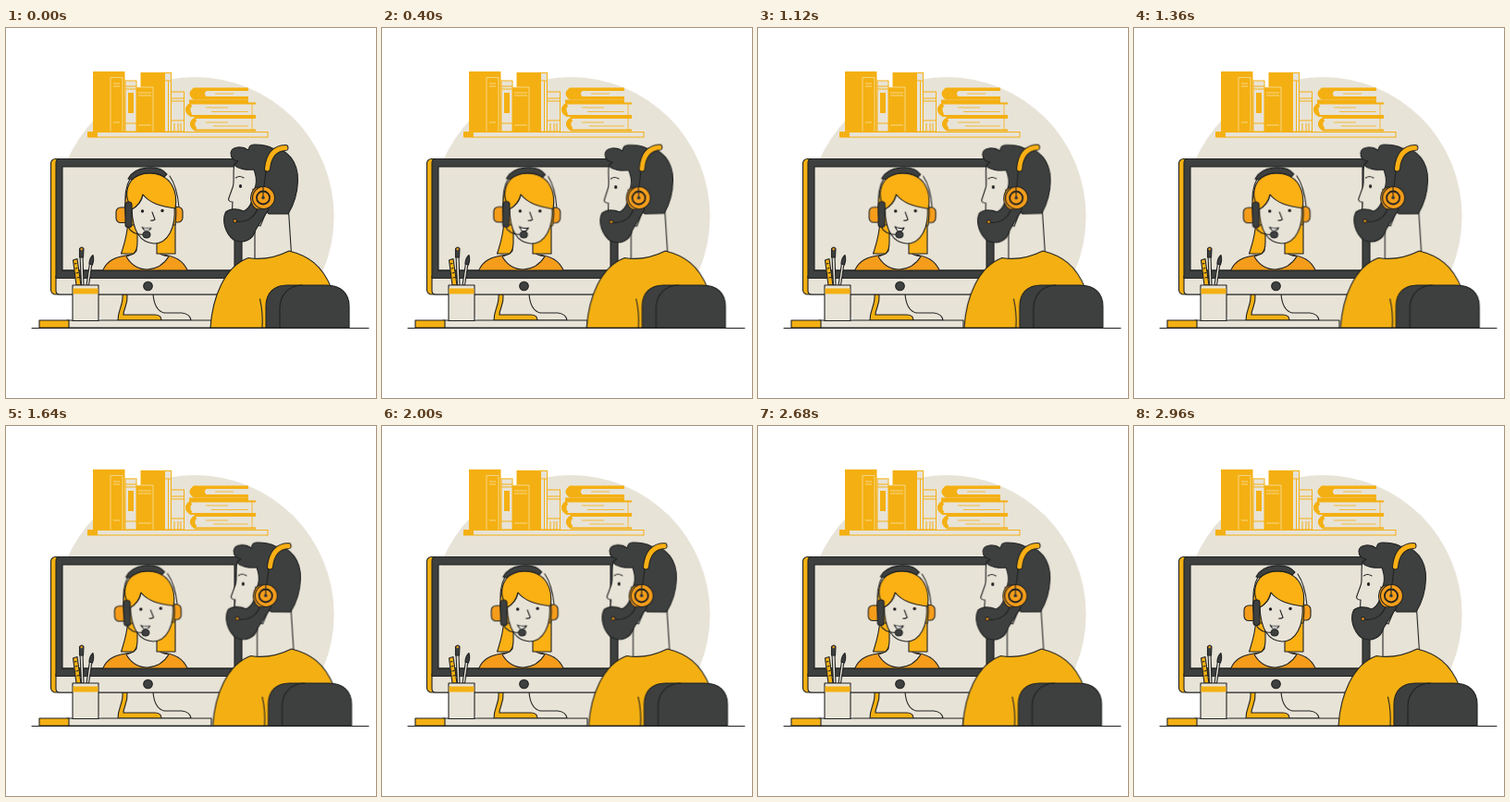
These frames come from a looping animation (400x400 px, 3 s). An HTML page:

```html
<!DOCTYPE html>
<html lang="en">
<head>
<meta charset="utf-8">
<title>Video call</title>
<style>
  html, body { margin: 0; width: 100%; height: 100%; overflow: hidden; background: #fff; }
  svg { display: block; width: 100vw; height: 100vh; }

  :root { --gold: #f4b012; --amber: #f59d1b; --hair: #fbb014; --sand: #e8e3d7; --dark: #3d403f; --ink: #202222; }
  .gold { fill: var(--gold); }
  .amber { fill: var(--amber); }
  .hair { fill: var(--hair); }
  .sand { fill: var(--sand); }
  .dark { fill: var(--dark); }
  .line { fill: none; stroke: var(--ink); stroke-width: 1.1; stroke-linecap: round; stroke-linejoin: round; }
  .edge { stroke: var(--ink); stroke-width: 1.1; stroke-linejoin: round; }
  .trim { stroke: var(--gold); stroke-width: 1; }
  .seam { fill: none; stroke: #f8dfa4; stroke-width: .8; }

  .man, .nod, .woman, .talk { animation: 3s ease-in-out infinite; }
  .man { animation-name: sway; }
  .nod { animation-name: nod; transform-origin: 285px 205px; }
  .woman { animation-name: tilt; transform-origin: 153px 245px; }
  .talk { animation-name: talk; transform-origin: 151px 217px; }

  @keyframes sway {
    0%, 100% { transform: none; }
    60% { transform: translateX(2.6px); }
  }
  @keyframes nod {
    0%, 100% { transform: rotate(0deg); }
    24% { transform: rotate(-3deg); }
    56%, 67% { transform: rotate(.5deg); }
    82% { transform: rotate(-.3deg); }
  }
  @keyframes tilt {
    0%, 100% { transform: translateX(0) rotate(0deg); }
    24% { transform: translateX(1.4px) rotate(2deg); }
    55% { transform: translateX(-.7px) rotate(-1.2deg); }
    81% { transform: translateX(.3px) rotate(.2deg); }
  }
  @keyframes talk {
    0%, 55%, 100% { transform: scaleY(.8); }
    24% { transform: scaleY(1.2); }
    78% { transform: scaleY(1); }
  }
</style>
</head>
<body>
<svg viewBox="0 0 400 400">
  <defs>
    <clipPath id="screen"><rect x="61" y="150" width="186" height="112"/></clipPath>
    <clipPath id="wall"><rect width="400" height="324"/></clipPath>
  </defs>

  <circle class="sand" cx="204" cy="203.6" r="150.6" clip-path="url(#wall)"/>

  <!-- shelf and upright books -->
  <g>
    <rect class="sand trim" x="88.5" y="112.500" width="194.500" height="5.500"/>
    <rect class="gold" x="88" y="112" width="11" height="6"/>
    <rect class="gold" x="94" y="47" width="34.500" height="65"/>
    <path class="seam" d="M113 112V53.500H126V112M116 60H123M116 63H123M116 102H123"/>
    <rect class="sand trim" x="129" y="57" width="12" height="55"/>
    <path class="trim" fill="none" d="M129 63H141M129 66H141M129 103H141"/>
    <rect class="gold" x="132" y="70" width="6" height="22"/>
    <rect class="sand trim" x="146" y="48.500" width="32.500" height="63.500"/>
    <path class="trim" fill="none" d="M175.500 57V112M171 57H178.500"/>
    <rect class="gold" x="146" y="48" width="26" height="64"/>
    <rect class="gold" x="141" y="64" width="18" height="48"/>
    <path class="seam" d="M141.500 64H159V112M143 70H157M143 73H157M143 105H157"/>
    <rect class="sand trim" x="178.500" y="69" width="14" height="43"/>
    <path class="trim" fill="none" d="M179 76H192M179 79H192M179 100H192M182 103V112M186 103V112M189 103V112"/>
  </g>

  <!-- stacked books -->
  <g fill="none" stroke="var(--gold)" stroke-width="2.200">
    <path class="gold" stroke="none" d="M262 64.500H203Q194 71 203 77.500H262V74H217Q213 71 217 68H262Z"/>
    <path class="sand" stroke="none" d="M259 68H217Q213 71 217 74H259Z"/>
    <path class="gold" stroke="none" d="M198 77.500H262V81H198Z"/>
    <path class="sand" d="M270 81.500H200Q190 88 200 95H270M270 97H205Q195 104 205 110.500H270"/>
    <path stroke-width="3.500" d="M200 83Q195 88 200 94M205 98.500Q200 104 205 109.500"/>
    <path stroke-width=".8" d="M226 71H246M216 86H240M222 90.500H262M216 102H240M224 106H262M266 82V95M266 97V110"/>
  </g>

  <!-- monitor stand -->
  <path class="sand" d="M131 288C131 299 126 302 124 312H170V308Q160 302 159 288Z"/>
  <path class="sand edge" d="M159 288C160 299 163 306 171 308H190Q199 309 200 316H168"/>
  <path class="gold edge" d="M126 288C127 300 121 304 121 316H168Q168 310 161 310H127C127 303 132 300 131 288Z"/>

  <!-- monitor -->
  <rect class="gold edge" x="48.500" y="141.500" width="206" height="146.500" rx="5"/>
  <path class="sand edge" d="M54 268H255V288H58Q54 288 54 284Z"/>
  <path class="dark edge" d="M58 141.500H250Q255 141.500 255 146V270.500H54V146Q54 141.500 58 141.500Z"/>
  <rect class="sand edge" x="61" y="150" width="186" height="112"/>
  <circle class="dark edge" cx="153.500" cy="279" r="4.800"/>

  <!-- caller -->
  <g clip-path="url(#screen)">
    <path class="amber edge" d="M104 264C108 252 117 247 136 245H168C183 246 193 253 197 264Z"/>
    <path class="sand edge" d="M141 222V241Q138 245 130 247Q138 261 153 261Q168 260 176 247Q165 246 164 240V222Z"/>
    <path class="hair edge" d="M132 208C131 226 127 236 124.500 244H138Q142 240 142 232V212ZM163 215V244H183V205Z"/>
    <g class="woman">
      <path class="line" d="M135 161C129 172 128 181 130 194M177 160C184 170 186 182 187 194"/>
      <rect class="amber edge" x="119" y="194" width="14" height="16.500" rx="5"/>
      <rect class="amber edge" x="179" y="193.500" width="12" height="16.500" rx="5"/>
      <path class="hair edge" d="M131 213C125 186 130 159 154 157C178 157 187 182 183 213Z"/>
      <path class="sand edge" d="M136 196C143 192 147 187 148 180C157 189 170 192 182 192C184 216 175 233 160 233C145 232 137 219 136 196Z"/>
      <path class="hair edge" d="M136 196C124 176 134 157 154 157C179 157 186 177 183 195C168 193 156 190 148 180C146 188 142 193 136 196Z"/>
      <path class="dark edge" d="M132 163C139 149 165 147 174 158L171 161C161 154 145 156 136 164Z"/>
      <circle cx="147.500" cy="198" r="1.700" fill="var(--ink)"/>
      <circle cx="169" cy="197.500" r="1.700" fill="var(--ink)"/>
      <path class="line" d="M158 199L161 207Q159 208.500 156.500 208"/>
      <path class="talk edge" fill="#fff" d="M147 215Q152 217.500 157 216Q155 220.500 150 219.500Z"/>
      <path class="line" stroke-width="1.600" d="M132 215C135 222 142 223.500 150 223.500"/>
      <rect class="dark edge" x="129" y="188" width="7" height="27.500" rx="3"/>
      <ellipse class="dark edge" cx="152" cy="223.500" rx="4" ry="3.500"/>
    </g>
  </g>
  <path class="line" d="M61 262H247"/>

  <!-- desk items -->
  <rect class="sand edge" x="66" y="316" width="156" height="8"/>
  <rect class="gold edge" x="36" y="316" width="32" height="8"/>
  <path class="gold edge" d="M72.500 251L77 249.500L81 278H76Z"/>
  <path class="line" stroke-width=".8" d="M74 255l2-.5M75 260l2-.5M76 265l2-.5M77 270l2-.5"/>
  <path class="sand edge" d="M80 246H83L84 278H81.500Z"/>
  <path class="dark edge" d="M79.500 238.500Q82 235.500 84 238.500L83.500 248H79.500Z"/>
  <circle class="amber" cx="81.700" cy="239" r="1.200"/>
  <path class="sand edge" d="M90.500 254L93 254.500L89.500 278H87Z"/>
  <path class="dark edge" d="M90 255Q90 249 94 245.500Q95.500 251 93.500 256Z"/>
  <rect class="sand edge" x="72" y="278" width="28" height="38.500"/>
  <rect class="gold" x="72.500" y="281.500" width="27" height="6"/>

  <!-- man -->
  <g class="man">
    <path class="sand edge" d="M269 205V252H309L305 190Z"/>
    <path class="gold edge" d="M221 324C223 292 236 258 262 248.500Q284 252 306 241C326 246 342 256 352 282V324Z"/>
    <path class="line" d="M274.500 293Q278 308 277 324"/>
    <g class="nod">
      <path class="sand edge" d="M247 146C245 156 247 164 245.500 171L240.500 185Q241 188 245 188L244 205L275 214L285 190L280 148Z"/>
      <path class="dark edge" d="M243 135C244 128 255 127 262 132Q263 126 268 126C277 126 283 127 288 130C305 130 316 146 315.500 165C315 181 310 193 305 201H284L275 190L266 178C271 172 272 164 268 153C260 154 250 152 247 148Q249 145 251 144Q243 143 243 135Z"/>
      <path class="dark edge" d="M267 174C268 184 265 194 257 198C250 195 242 195 237.500 199C233 208 237 222 246 229C257 234 267 229 270 218L284 196Z"/>
      <path class="line" d="M248.500 162Q252 159 257 162"/>
      <ellipse cx="253.500" cy="171" rx="1.600" ry="2" fill="var(--ink)"/>
      <path class="line" style="stroke-width:7" d="M282.500 152C284 138 290 130 302 129.500"/>
      <path fill="none" stroke="var(--hair)" stroke-width="5" stroke-linecap="round" d="M282.500 152C284 138 290 130 302 129.500"/>
      <path class="line" d="M281 155L279 171"/>
      <path class="line" d="M272 195C269 204 261 211 248 209"/>
      <circle class="amber edge" cx="247.500" cy="208.500" r="1.900"/>
      <ellipse class="amber edge" cx="273.500" cy="184" rx="9" ry="12"/>
      <circle class="amber edge" cx="278.500" cy="183.500" r="12"/>
      <circle class="line" style="stroke-width:1.800" cx="278" cy="183.500" r="7"/>
      <circle class="dark" cx="278" cy="183.500" r="1.800"/>
      <path class="line" d="M278 172V183"/>
    </g>
    <path class="dark edge" d="M281 324V301C281 286 290 278 304 278H346C362 278 371 287 371 301V324Z"/>
    <path class="line" d="M296 324V303C296 288 306 278.500 320 278"/>
  </g>

  <path class="line" d="M28 324.500H392"/>
</svg>
</body>
</html>
```
